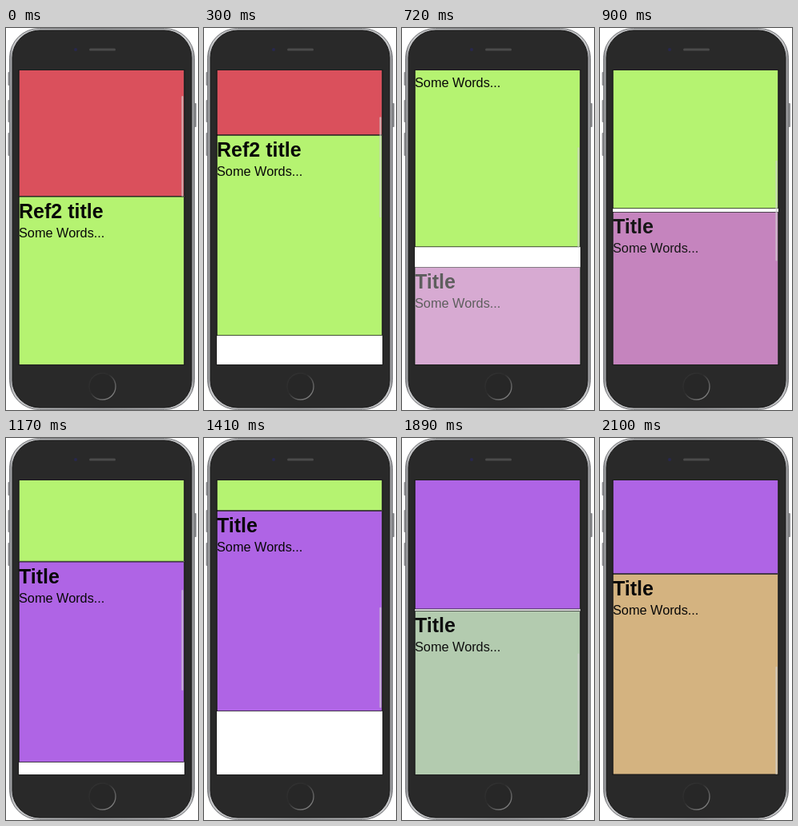
These frames come from a looping animation (240 px wide and 478 px high, 2160 ms). An HTML page:

```html
<!DOCTYPE html>
<html lang="en">
<head>
<meta charset="utf-8">
<title>Scroll reveal</title>
<style>
  html, body { margin: 0; width: 100%; height: 100%; overflow: hidden; background: #fff; }
  svg { display: block; width: 240px; height: 478px; }
  text { font-family: "Liberation Sans", Arial, sans-serif; fill: #080808; }
  .title { font-size: 25px; font-weight: 700; }
  .words { font-size: 16.3px; }
</style>
</head>
<body>
<svg viewBox="0 0 240 478">
  <defs>
    <clipPath id="screen"><rect x="16" y="53" width="207" height="368"/></clipPath>
    <linearGradient id="metal" x1="0" x2="1">
      <stop offset="0" stop-color="#85868a"/>
      <stop offset=".02" stop-color="#c4c5c7"/>
      <stop offset=".5" stop-color="#a2a3a5"/>
      <stop offset=".98" stop-color="#c4c5c7"/>
      <stop offset="1" stop-color="#85868a"/>
    </linearGradient>
    <linearGradient id="ring" x1="0" y1="0" x2="1" y2="1">
      <stop offset="0" stop-color="#333"/>
      <stop offset=".4" stop-color="#2c2c2c"/>
      <stop offset="1" stop-color="#999"/>
    </linearGradient>
  </defs>
  <g fill="#8b8c8f">
    <rect x="2.5" y="55" width="4" height="17" rx="1"/>
    <rect x="2.5" y="90" width="4" height="28" rx="1"/>
    <rect x="2.5" y="131" width="4" height="29" rx="1"/>
    <rect x="234" y="94" width="4" height="30" rx="1"/>
  </g>
  <rect x="4.5" y=".5" width="231" height="477" rx="37" fill="url(#metal)" stroke="#77787b"/>
  <rect x="8" y="3" width="224" height="472" rx="34" fill="#292929" stroke="#1a1a1a"/>
  <circle cx="87" cy="27" r="2" fill="#28284d"/>
  <rect x="104" y="25.5" width="33" height="3" rx="1.5" fill="#4b4b4b"/>
  <circle cx="120.5" cy="448.5" r="16.5" fill="#272727" stroke="url(#ring)" stroke-width="1.3"/>
  <rect x="15" y="52" width="209" height="370" fill="#1d1d1d"/>
  <g clip-path="url(#screen)">
    <rect x="16" y="53" width="207" height="368" fill="#fff"/>
    <g id="page"></g>
    <rect id="bar" x="219.5" width="2" rx="1" fill="#cfcfcf" fill-opacity=".75"/>
  </g>
</svg>
<script>
const LOOP = 2160, STEP = 30, LAST = 2100;
const VIEW = 368, TOP = 53, HEIGHT = 251, RISE = 71;
const sections = [
  { color: [218, 80, 92] },
  { title: "Ref2 title", color: [181, 243, 113] },
  { title: "Title", color: [175, 100, 229], from: [194, 125, 186], start: 550 },
  { title: "Title", color: [212, 179, 128], from: [166, 209, 187], start: 1475 }
];
// Time in ms and the on-screen top of the second section.
const path = [[0, 210.8], [300, 134], [570, 63.2], [900, -25], [1410, -160], [1680, -233], [2060, -332]];

const clamp = x => Math.min(1, Math.max(0, x));
const mix = (a, b, k) => a + (b - a) * k;
const smooth = x => x * x * (3 - 2 * x);

function spring(ms) {
  const x = 13 * Math.max(0, ms) / 1000;
  return 1 - (1 + x) * Math.exp(-x);
}

function follow(t) {
  const i = path.findIndex(p => p[0] > t);
  if (i < 0) return path[path.length - 1][1];
  const [a, b] = [path[i - 1], path[i]];
  return mix(a[1], b[1], (t - a[0]) / (b[0] - a[0]));
}

function add(parent, tag, attrs, content = "") {
  const el = document.createElementNS("http://www.w3.org/2000/svg", tag);
  for (const key in attrs) el.setAttribute(key, attrs[key]);
  el.textContent = content;
  return parent.appendChild(el);
}

const page = document.getElementById("page");
const bar = document.getElementById("bar");
for (const s of sections) {
  s.group = add(page, "g", {});
  s.box = add(s.group, "rect", {
    x: 16.3, y: 0.3, width: 206.2, height: HEIGHT - 0.6, stroke: "#000", "stroke-width": 0.7
  });
  if (s.title) {
    add(s.group, "text", { x: 16, y: 27, class: "title" }, s.title);
    add(s.group, "text", { x: 16, y: 51, class: "words" }, "Some Words...");
  }
}

function draw(t) {
  const second = follow(t);
  let shown = 1;
  sections.forEach((s, i) => {
    const age = s.from ? t - s.start : Infinity;
    shown = s.from ? spring(age) : 1;
    const tint = smooth(clamp((age - 330) / 270));
    const rgb = s.color.map((c, j) => s.from ? Math.round(mix(s.from[j], c, tint)) : c);
    const y = second + (i - 1) * HEIGHT + RISE * (1 - shown);
    s.group.setAttribute("transform", `translate(0 ${y.toFixed(2)})`);
    s.group.setAttribute("opacity", shown.toFixed(3));
    s.box.setAttribute("fill", `rgb(${rgb})`);
  });
  // The last section's offset lengthens the scrollable content.
  const ratio = VIEW / (sections.length * HEIGHT + RISE * (1 - shown));
  const scroll = TOP + HEIGHT - second;
  bar.setAttribute("y", TOP + scroll * ratio);
  bar.setAttribute("height", VIEW * ratio);
}

const begin = performance.now();
function tick() {
  const t = (performance.now() - begin) % LOOP;
  draw(Math.min(LAST, Math.floor(t / STEP) * STEP));
  requestAnimationFrame(tick);
}
tick();
</script>
</body>
</html>
```
